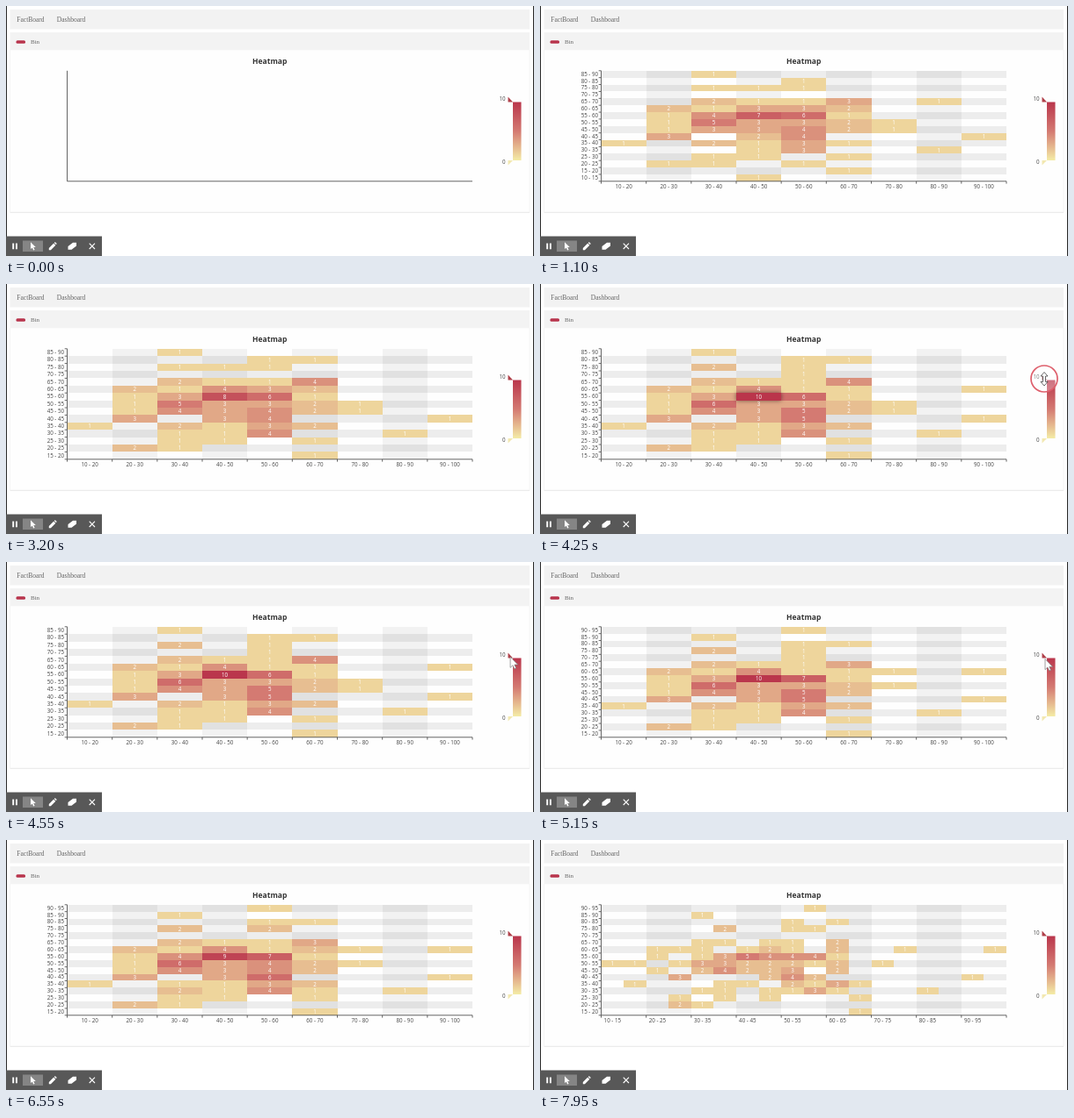
Write an HTML page that moves like this. It is 600 by 285 pixels and loops after 8 s.

```html
<!DOCTYPE html>
<html lang="en">
<head>
<meta charset="utf-8">
<title>Heatmap dashboard</title>
<style>
  html, body { margin: 0; width: 100%; height: 100%; overflow: hidden; background: #fff; }
  svg { display: block; width: 100vw; height: 100vh; }
  text { font: 6.2px "Open Sans", "Noto Sans", sans-serif; fill: #444; }
  .serif { font: 7.5px "Liberation Serif", "Noto Serif", serif; fill: #666; }
  .title { font-size: 8.5px; font-weight: 700; fill: #333; text-anchor: middle; }
  .mid { text-anchor: middle; }
  .end { text-anchor: end; }
  .val { fill: #fff; text-anchor: middle; }
  .tip text { font-size: 7px; fill: #fff; }
  .axis { stroke: #555; stroke-width: .9; fill: none; }
  .crisp { shape-rendering: crispEdges; }
</style>
</head>
<body>
<svg viewBox="0 0 600 285" preserveAspectRatio="none">
  <defs>
    <linearGradient id="ramp" x1="0" y1="0" x2="0" y2="1">
      <stop offset="0" stop-color="#ba364c"/>
      <stop offset=".5" stop-color="#d47a72"/>
      <stop offset="1" stop-color="#f4eca6"/>
    </linearGradient>
    <filter id="glow" x="-30%" y="-120%" width="160%" height="340%">
      <feDropShadow dx="0" dy="0" stdDeviation="2.4" flood-color="#000" flood-opacity=".5"/>
    </filter>
  </defs>

  <rect width="600" height="285" fill="#fff"/>
  <rect x="4.5" y="4" width="590.5" height="22.5" fill="#f2f2f2"/>
  <rect x="4.5" y="30" width="590.5" height="20.5" fill="#f3f3f3"/>
  <rect x="4.5" y="50.5" width="590.5" height="184.5" fill="#fefefe"/>
  <path d="M4.5 235.3H595" stroke="#e6e6e6"/>
  <path d="M4.5 50V235M595 50V235" stroke="#f4f4f4"/>
  <path d="M.4 0V285M599.6 0V285" stroke="#111" stroke-width="1"/>
  <text class="serif" x="12.3" y="17.8">FactBoard</text>
  <text class="serif" x="57.8" y="17.8">Dashboard</text>
  <rect x="11.5" y="39.3" width="10.5" height="3.4" rx="1.5" fill="#b8344c"/>
  <text class="serif" x="28" y="43.2" style="font-size:7px">Bin</text>
  <text class="title" x="299.7" y="66">Heatmap</text>

  <g id="chart"></g>
  <path class="axis" d="M69.5 73.8V199.8H530"/>

  <rect x="576" y="109.5" width="9.5" height="66.5" fill="url(#ramp)"/>
  <path d="M570.5 103.5L576 109.5H570.5Z" fill="#b0404a"/>
  <path d="M570.5 176H576L570.5 181.5Z" fill="#f2e8b0"/>
  <text class="end" x="567.6" y="108.3">10</text>
  <text class="end" x="567.6" y="179.5">0</text>

  <g id="tip" class="tip">
    <rect x="279" y="98" width="41.5" height="24.5" rx="2" fill="#323232" fill-opacity=".72"/>
    <text x="281.3" y="107.6">count</text>
    <circle cx="284" cy="115.3" r="2.2" fill="#c2485a"/>
    <text x="288.2" y="117.8">50 - 60: 6</text>
  </g>

  <g id="grab">
    <circle cx="573" cy="108" r="15" fill="#fff" fill-opacity=".3" stroke="#de5f6c" stroke-width="1.7"/>
    <path d="M573 100.5L577 105H574.5V111.5H577L573 116L569 111.5H571.5V105H569Z" fill="#fff" stroke="#444" stroke-width=".8"/>
  </g>
  <path id="arrow" d="M0 0V12.2L2.8 9.6L4.7 13.6L6.6 12.7L4.8 8.9H8.6Z" fill="#fff" stroke="#777" stroke-width=".7"/>

  <rect y="262.5" width="109" height="22.5" fill="#585858"/>
  <rect x="19" y="267.5" width="23" height="12.5" fill="#858585"/>
  <g fill="#fff">
    <path d="M7.3 270.5h1.9v6.8h-1.9zM11 270.5h1.9v6.8h-1.9z"/>
    <path d="M28 269.2V277L29.8 275.4L31.2 278.4L32.6 277.7L31.2 274.9H33.8Z"/>
    <path d="M48.8 278.2V276L54.2 270.6L56.3 272.7L50.9 278.2ZM54.8 270L55.8 269.1L57.8 271.1L56.9 272.1Z"/>
    <path d="M70.5 274L76 269.8H80V273.4L74.5 277.8H70.5Z"/>
    <path d="M94.7 270.7L101 277M101 270.7L94.7 277" stroke="#fff" stroke-width="1.1"/>
  </g>
</svg>
<script>
const LOOP = 8000, FIRST = 700, STEP = 1000;
const BOX = { x: 69.5, y: 73.8, w: 460.5, h: 126 };
const $ = id => document.getElementById(id);

// Each update replaces the rows whose counts changed; null drops a row.
const updates = [
  { 85: '..1', 80: '....1', 75: '..111', 70: '', 65: '..2113.1', 60: '.21332', 55: '.14761',
    50: '.153321', 45: '.133421', 40: '.3.24...1', 35: '1.2131', 30: '...13..1', 25: '..11.1',
    20: '.11.1', 15: '.....1', 10: '...1' },
  { 80: '....11', 65: '..2113', 60: '.21432', 45: '.133411', 40: '.3.34...1', 35: '1.2231',
    30: '..114..1', 20: '.11', 10: null },
  { 65: '..2114', 55: '.13861', 45: '.143421', 35: '1.2132', 20: '.21' },
  { 75: '..2.1', 70: '....1', 60: '.21411..1', 55: '.13a61', 50: '.163321', 45: '.143521', 40: '.3.35...1' },
  { 90: '....1', 65: '..2113', 60: '.214111.1', 55: '.13a71', 45: '.14352' },
  { 75: '..2.2', 70: '', 60: '.214121.1', 55: '.14971', 50: '.163421', 45: '.14342', 40: '.3.36...1',
    35: '1.1132', 30: '..2141.1' },
  { 90: '.........1', 85: '....1', 80: '........1.1', 75: '.....2..11', 65: '....11.11.2',
    60: '..111.121.2..1...1', 55: '..1.1344441', 50: '11.133222.2.1', 45: '..1.242221',
    40: '...3...142......1', 35: '.1...11.2131', 30: '....11.1131...1', 25: '...1.1.1...1',
    20: '...21', 15: '...........1' },
  { 80: '........1.1', 55: '..1.1354441', 50: '11.13322212.1', 45: '..1.24223.2', 40: '...3...242......1' }
];
const states = [];
updates.forEach((u, i) => states.push({ ...states[i - 1], ...u }));

const ramp = [[244, 236, 166], [212, 122, 114], [186, 54, 76]];
function shade(v) {
  const p = v / 5, i = Math.min(1, Math.floor(p)), f = p - i;
  return `rgb(${ramp[i].map((c, k) => Math.round(c + (ramp[i + 1][k] - c) * f))})`;
}
const rect = (x, y, w, h, fill, extra = '') =>
  `<rect class="crisp" x="${x}" y="${y}" width="${w}" height="${h}" fill="${fill}" ${extra}/>`;
const label = (cls, x, y, s) => `<text class="${cls}" x="${x}" y="${y}">${s}</text>`;
const band = i => i % 2 ? 'rgba(200,200,200,.33)' : 'rgba(250,250,250,.3)';

function chart(index, hot) {
  const rows = states[index], split = index > 5;
  const keys = Object.keys(rows).map(Number).filter(k => rows[k] !== null).sort((a, b) => b - a);
  const n = keys.length, cols = split ? 18 : 9;
  const rh = BOX.h / n, cw = BOX.w / cols, bw = BOX.w / 9, bottom = BOX.y + BOX.h;
  let back = '', cells = '', top = '', text = '', ticks = '';

  for (let i = 0; i < 9; i++) {
    const x = BOX.x + i * bw, lo = 10 + i * 10;
    back += rect(x, BOX.y, bw, BOX.h, band(i));
    text += label('mid', x + (split ? cw : bw) / 2, 207.7, `${lo} - ${lo + (split ? 5 : 10)}`);
  }
  for (let i = 0; i <= 9; i++) ticks += `M${BOX.x + i * bw} ${bottom}v2.8`;
  for (let i = 0; i <= n; i++) ticks += `M${BOX.x} ${BOX.y + i * rh}h-2.8`;

  keys.forEach((k, r) => {
    const y = BOX.y + r * rh, base = y + rh / 2 + 2.2;
    back += rect(BOX.x, y, BOX.w, rh, band(n - 1 - r));
    text += label('end', 66, base - .2, `${k} - ${k + 5}`);
    [...rows[k]].forEach((ch, c) => {
      if (ch === '.') return;
      const v = parseInt(ch, 16), x = BOX.x + c * cw;
      const glow = hot && v === 10;
      const cell = rect(x, y, cw, rh, shade(v), glow ? 'filter="url(#glow)"' : '');
      if (glow) top += cell; else cells += cell;
      text += label('val', x + cw / 2, base, v);
    });
  });
  return `${back}${cells}${top}<path class="axis" d="${ticks}"/>${text}`;
}

// Pointer stops: time, x, y
const stops = [[3400, 597, 251], [3950, 573, 108], [4500, 573, 108], [4800, 574, 110.5],
  [5250, 574, 110.5], [5650, 600, 213]];
function pointer(t) {
  const i = stops.findIndex((s, k) => k < stops.length - 1 && t >= s[0] && t < stops[k + 1][0]);
  if (i < 0) return null;
  const [a, b] = [stops[i], stops[i + 1]];
  const f = (t - a[0]) / (b[0] - a[0]), e = f * f * (3 - 2 * f);
  return [a[1] + (b[1] - a[1]) * e, a[2] + (b[2] - a[2]) * e];
}
const clamp = v => Math.max(0, Math.min(1, v));

let shown = '';
function draw(t) {
  const index = Math.floor((t - FIRST) / STEP), held = t >= 3950 && t < 4500;
  const key = `${index}${held}`;
  if (key !== shown) {
    $('chart').innerHTML = index < 0 ? '' : chart(index, held);
    shown = key;
  }
  $('tip').setAttribute('opacity', Math.min(clamp((t - 1750) / 150), clamp((2700 - t) / 200)));
  $('grab').setAttribute('opacity', held ? 1 : 0);
  const p = held ? null : pointer(t);
  $('arrow').setAttribute('opacity', p ? 1 : 0);
  if (p) $('arrow').setAttribute('transform', `translate(${p})`);
}

const start = performance.now();
function tick() {
  draw((performance.now() - start) % LOOP);
  requestAnimationFrame(tick);
}
tick();
</script>
</body>
</html>
```
